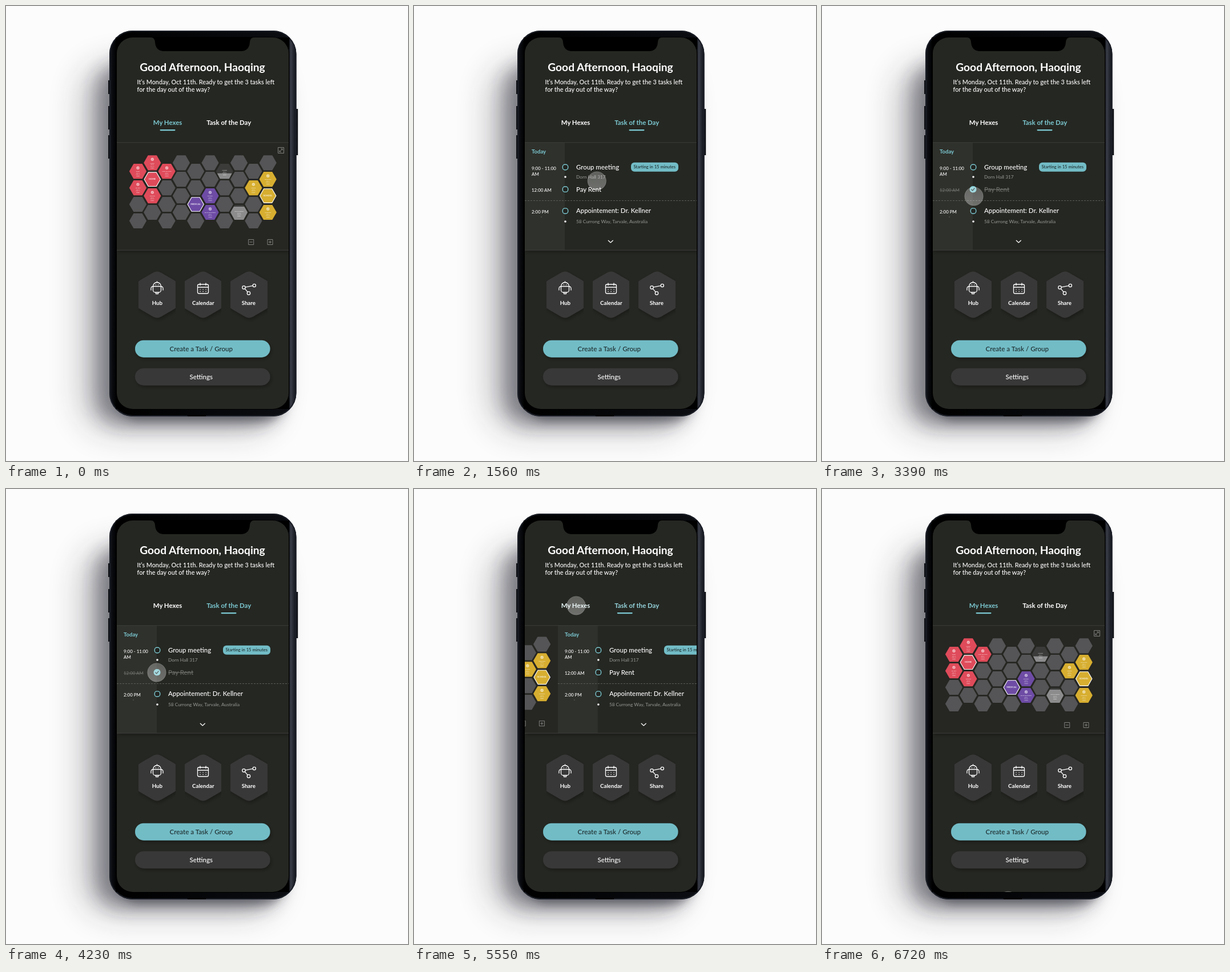
Animation, 704 px wide and 796 px high, one loop 6750 ms. Source, as an HTML page:

```html
<!DOCTYPE html>
<html lang="en">
<head>
<meta charset="utf-8">
<title>Hex planner</title>
<style>
html, body { margin: 0; width: 100%; height: 100%; overflow: hidden; background: #fcfcfc; }
svg { display: block; }
text { font-family: Lato, "Open Sans", sans-serif; fill: #fff; font-weight: 500; }
.b { font-weight: 700; }
.mid { text-anchor: middle; }
.h1 { font-size: 19.2px; }
.sub { font-size: 10.8px; }
.tab { font-size: 11.4px; }
.task { font-size: 11.4px; }
.time { font-size: 7.9px; }
.note { font-size: 8.3px; fill: #8f918e; }
.icon { fill: none; stroke: #fff; stroke-width: 1.3; stroke-linecap: round; stroke-linejoin: round; }
.tool { fill: none; stroke: #8a8b88; stroke-width: .9; }
.ring { fill: #232521; stroke: #7cc9d2; stroke-width: 1.4; }
.done text { fill: #6d6f6b; text-decoration: line-through; }
</style>
</head>
<body>
<svg width="704" height="796" viewBox="0 0 704 796">
  <defs>
    <filter id="far" x="-60%" y="-30%" width="220%" height="160%"><feGaussianBlur stdDeviation="30"/></filter>
    <filter id="near" x="-40%" y="-20%" width="180%" height="140%"><feGaussianBlur stdDeviation="16"/></filter>
    <filter id="contact" x="-20%" y="-40%" width="140%" height="180%"><feGaussianBlur stdDeviation="8"/></filter>
    <filter id="drop" x="-20%" y="-30%" width="140%" height="170%">
      <feDropShadow dx="2" dy="3" stdDeviation="3" flood-color="#000" flood-opacity=".3"/>
    </filter>
    <linearGradient id="body">
      <stop offset="0" stop-color="#20232b"/><stop offset=".012" stop-color="#0b0d12"/>
      <stop offset=".04" stop-color="#000"/><stop offset=".96" stop-color="#0b0d12"/>
      <stop offset=".97" stop-color="#3a3e48"/><stop offset=".985" stop-color="#23262e"/>
      <stop offset="1" stop-color="#0f1117"/>
    </linearGradient>
    <linearGradient id="glass" x2="0" y2="1">
      <stop offset="0" stop-color="#fff" stop-opacity=".27"/><stop offset="1" stop-color="#fff" stop-opacity=".34"/>
    </linearGradient>
    <clipPath id="screen"><rect x="194" y="55" width="301" height="650" rx="28"/></clipPath>
    <clipPath id="panel"><rect x="194" y="238" width="301" height="190"/></clipPath>
  </defs>

  <rect width="704" height="796" fill="#fcfcfc"/>
  <g fill="#22222e">
    <rect x="135" y="105" width="335" height="635" rx="50" opacity=".3" filter="url(#far)"/>
    <rect x="160" y="100" width="322" height="632" rx="45" opacity=".42" filter="url(#near)"/>
    <rect x="198" y="600" width="290" height="126" rx="35" opacity=".4" filter="url(#contact)"/>
  </g>
  <path d="M180.5 130v24M180.5 175v41M180.5 226v41M509.7 180v81" stroke="#0d0f14" stroke-width="3"/>
  <rect x="181" y="43" width="327.5" height="675" rx="41" fill="url(#body)"/>
  <rect x="182" y="44" width="325.5" height="673" rx="40" fill="none" stroke="#1a1d25" stroke-width="2"/>
  <rect x="192" y="54" width="304" height="652" rx="30"/>
  <path d="M192 55h20v20h-20zM476 55h20v20h-20zM192 685h20v20h-20zM476 685h20v20h-20z"/>
  <path d="M318 716.5h32" stroke="#000" stroke-width="2.5"/>

  <g clip-path="url(#screen)">
    <rect x="194" y="55" width="301" height="650" fill="#252722"/>
    <path d="M254 55q6 0 7 8q1 16 16 16h134q15 0 16-16q1-8 7-8z"/>

    <text class="h1 b mid" x="344" y="113.5">Good Afternoon, Haoqing</text>
    <text class="sub" x="229.5" y="136.5">It’s Monday, Oct 11th. Ready to get the 3 tasks left</text>
    <text class="sub" x="229.5" y="150">for the day out of the way?</text>
    <text class="tab b mid" x="283" y="207.5" id="tabHex">My Hexes</text>
    <text class="tab b mid" x="390.2" y="207.5" id="tabDay">Task of the Day</text>
    <rect id="bar" x="269.5" y="216" width="27" height="2.2" rx="1.1" fill="#7cc9d2"/>

    <rect x="194" y="238" width="301" height="189.5" fill="#252722" filter="url(#drop)"/>
    <g clip-path="url(#panel)">
      <g id="cells"></g>
      <g id="tools" class="tool">
        <path d="M424.7 408.5h9v9h-9zM426.7 413h5M458 408.5h9v9h-9zM460 413h5M462.5 410.5v5"/>
        <path id="expand" d="M476.5 247.5h10v10h-10zM479 255l5-5M481.5 249.8h2.7v2.7M481.5 255.2h-2.7v-2.7"/>
      </g>
      <g id="day">
        <rect x="194" y="239" width="301" height="188" fill="#252722"/>
        <rect x="194" y="239" width="70" height="188" fill="#2f312c"/>
        <path d="M194 340.5h301" stroke="#5a5c58" stroke-dasharray="3 2"/>
        <text class="b" x="206" y="258" style="font-size:9.5px;fill:#7cc9d2">Today</text>
        <text class="time" x="206" y="286.5">9:00 - 11:00</text>
        <text class="time" x="206" y="297.3">AM</text>
        <text class="time" x="206" y="362.5">2:00 PM</text>
        <circle cx="223" cy="369" r=".6" fill="#999"/>
        <text class="task" x="284" y="286">Group meeting</text>
        <text class="note" x="284" y="302">Dorn Hall 317</text>
        <text class="task" x="284" y="362">Appointement: Dr. Kellner</text>
        <text class="note" x="284" y="380">58 Currong Way, Tarvale, Australia</text>
        <g id="rent">
          <text class="time" x="206" y="325">12:00 AM</text>
          <text class="task" x="284" y="324.7">Pay Rent</text>
        </g>
        <rect x="380" y="273.8" width="83" height="16" rx="6" fill="#72bcc6"/>
        <text class="mid" x="421.3" y="284.4" style="font-size:7.6px;fill:#1d2b2c">Starting in 15 minutes</text>
        <g class="ring">
          <rect x="260.3" y="277.3" width="9.4" height="9.4" rx="4"/>
          <rect x="260.3" y="316" width="9.4" height="9.4" rx="4"/>
          <rect x="260.3" y="353.9" width="9.4" height="9.4" rx="4"/>
        </g>
        <g id="tick">
          <circle cx="264.2" cy="320.7" r="5.7" fill="#7cc9d2"/>
          <path class="icon" d="M261.7 321l2 2l3.3-4.2" style="stroke:#1d2b2c"/>
        </g>
        <g fill="#fff"><circle cx="265" cy="299" r="1.8"/><circle cx="265" cy="377" r="1.8"/></g>
        <path class="icon" d="M340.3 410.3l4 3.6l4-3.6"/>
      </g>
    </g>
    <path d="M194 238.8h301M194 427.2h301" stroke="#3d3f3a"/>

    <g id="pads" fill="#383838" stroke="#383838" stroke-width="28" stroke-linejoin="round"></g>
    <g class="icon">
      <path d="M257.5 490.5a7 7 0 0 1 14 0zM257.5 490.5v6.5a4 4 0 0 0 4 4h6a4 4 0 0 0 4-4v-6.5"/>
      <path d="M264.5 483.5v-1.5M257.5 490.5c-3 0-4 2.5-3.5 6.5M271.500 490.500c3 0 4 2.500 3.500 6.500M262.500 501v2.500h4v-2.500M262.300 487.500h.1M266.700 487.500h.1"/>
      <rect x="335.5" y="487" width="19" height="16" rx="2.5"/>
      <path d="M335.5 492h19M340 485v3.5M350 485v3.5M340 495.8h.2M345 495.8h.2M350 495.8h.2M340 499.5h.2M345 499.5h.2M350 499.5h.2"/>
      <path d="M419.3 491.8l12.900-2.400M418.300 494.600l4.900 5.700"/>
      <circle cx="416.5" cy="492.4" r="2.7"/><circle cx="434.8" cy="488.9" r="2.6"/><circle cx="425" cy="502.4" r="2.7"/>
    </g>
    <g class="mid" style="font-size:9.7px">
      <text class="b" x="264.8" y="522.8">Hub</text>
      <text class="b" x="345.3" y="522.8">Calendar</text>
      <text class="b" x="424.8" y="522.8">Share</text>
    </g>

    <rect x="226" y="584.7" width="236.5" height="30" rx="15" fill="#72bcc6" filter="url(#drop)"/>
    <text class="mid" x="341.8" y="603.7" style="font-size:11.6px;fill:#1d2b2c">Create a Task / Group</text>
    <rect x="226" y="633.7" width="236.5" height="30" rx="15" fill="#383838" filter="url(#drop)"/>
    <text class="mid" x="341.8" y="653" style="font-size:11.5px">Settings</text>

    <circle id="touch" r="16.3" fill="url(#glass)" stroke="#fff" stroke-opacity=".2" stroke-width=".8"/>
  </g>
</svg>
<script>
const $ = id => document.getElementById(id);

// Hexagon path around a centre; "turn" gives the first corner's angle.
function hexPath(x, y, r, turn = 0) {
  const pts = [...Array(6).keys()].map(i => {
    const a = turn + i * Math.PI / 3;
    return `${(x + r * Math.cos(a)).toFixed(2)} ${(y + r * Math.sin(a)).toFixed(2)}`;
  });
  return `M${pts.join("L")}z`;
}

// Cells are keyed "column,row"; uppercase labels mark a group's head.
const groups = {
  "#df4b5a": { "1,0": "Laundry", "0,0": "Dishes", "2,0": "Water the plants", "0,1": "Pay Rent", "1,1": "HOME", "1,2": "Groceries" },
  "#6e4ca5": { "4,2": "MEDICAL", "5,2": "Pharmacy", "5,3": "Doctor appointment" },
  "#d7ae30": { "9,1": "Group work", "8,1": "Reading", "9,2": "SCHOOL", "9,3": "Homework" }
};
const loose = { "6,0": ["Workout", 3.5], "7,3": ["Call the landlord", -10] };

const label = (x, y, size, s, bold) =>
  `<text class="mid ${bold ? "b" : ""}" x="${x}" y="${y}" style="font-size:${size}px">${s}</text>`;

function details(x, y, name) {
  return label(x, y + 1.2, 2.2, name) + label(x, y + 4, 1.8, "Oct 11") +
    label(x, y + 6.2, 1.8, "9:00 AM") + label(x, y + 9.2, 2.4, "HIGH", true);
}

function cell(c, r) {
  const x = 231 + c * 25.3, y = (c % 2 ? 274.3 : 289.2) + r * 28.9, key = c + "," + r;
  const shape = (fill, edge = fill, w = 1.6) =>
    `<path d="${hexPath(x, y, 14.2)}" fill="${fill}" stroke="${edge}" stroke-width="${w}" stroke-linejoin="round"/>`;
  for (const color in groups) {
    const name = groups[color][key];
    if (!name) continue;
    if (name === name.toUpperCase())
      return shape(color, "#fff", 1.1) +
        `<g letter-spacing=".35">${label(x, y + 1.2, 3.4, name, true)}</g>`;
    return shape(color) +
      `<circle cx="${x}" cy="${y - 6}" r="2.7" fill="#fff" opacity=".6"/>` +
      `<path d="M${x - 1.2} ${y - 6}l1 1l1.5 -2" fill="none" stroke="${color}" stroke-width=".6"/>` +
      details(x, y, name);
  }
  if (loose[key]) {
    const [name, level] = loose[key], half = 15 - Math.abs(level) * .577, low = 8;
    return shape("#3b3c3a") +
      `<path d="M${x - half} ${y + level}${level < 0 ? `L${x - 15} ${y}` : ""}L${x - low} ${y + 13}h${2 * low}` +
      `${level < 0 ? `L${x + 15} ${y}` : ""}L${x + half} ${y + level}z" fill="#8c8c8d"/>` + details(x, y - 2, name);
  }
  return shape("#555557");
}

let cells = "";
for (let c = 0; c < 10; c++) for (let r = 0; r < 4; r++) cells += cell(c, r);
$("cells").innerHTML = cells;
$("pads").innerHTML = [264.6, 345.1, 425.6]
  .map(x => `<g filter="url(#drop)"><path d="${hexPath(x, 505, 26.3, Math.PI / 6)}"/></g>`).join("");

// Eased value of a track of [time, value] points.
function track(points, t) {
  const i = points.findIndex(p => p[0] > t);
  if (i < 0) return points[points.length - 1][1];
  if (!i) return points[0][1];
  const [t0, a] = points[i - 1], [t1, b] = points[i], u = (t - t0) / (t1 - t0);
  return a + (b - a) * u * u * (3 - 2 * u);
}
const slide = [[825, 0], [1300, 1], [5415, 1], [5897, 0]];
const touchX = [[100, 515], [600, 392], [1280, 392], [1800, 264], [2400, 264], [2650, 266],
  [3500, 266], [3800, 264], [4500, 264], [5050, 284], [6050, 284], [6745, 326]];
const touchY = [[100, 300], [600, 202], [1250, 202], [1650, 321], [2400, 321], [2650, 333],
  [3500, 333], [3800, 321], [4500, 321], [5050, 204], [6050, 204], [6745, 722]];

const teal = [124, 201, 210];
const tint = p => `rgb(${teal.map(v => Math.round(255 + (v - 255) * p))})`;
const move = (id, x, y = 0) => $(id).setAttribute("transform", `translate(${x} ${y})`);

function draw(now) {
  const t = now % 6750, p = track(slide, t), done = t > 2300 && t < 4330;
  const lift = -3 * p ** .3;
  move("cells", -291 * p, lift);
  move("tools", -296 * p, lift);
  move("day", 298.6 * (1 - p));
  move("bar", 107 * p);
  move("touch", track(touchX, t), track(touchY, t));
  $("tabHex").style.fill = tint(1 - p);
  $("tabDay").style.fill = tint(p);
  $("expand").style.display = p > 0 ? "none" : "";
  $("day").style.display = p > 0 ? "" : "none";
  $("rent").setAttribute("class", done ? "done" : "");
  $("tick").style.display = done ? "" : "none";
}

const start = performance.now();
function loop() {
  draw(performance.now() - start);
  requestAnimationFrame(loop);
}
loop();
</script>
</body>
</html>
```
